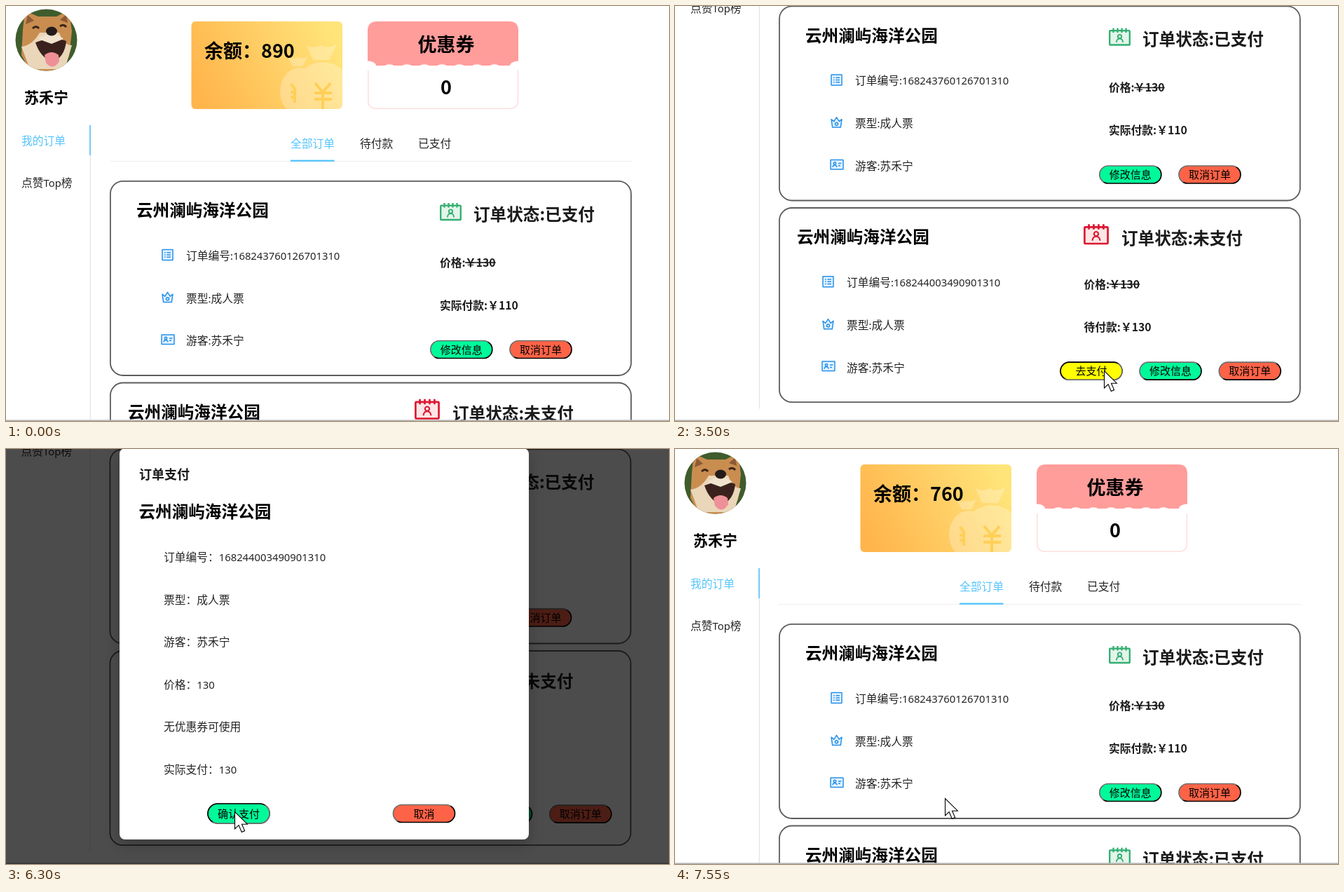
Recreate the animation shown at these times as an HTML page. Size 946 by 592 pixels, loop 8 s.

```html
<!DOCTYPE html>
<html lang="zh-CN">
<head>
<meta charset="utf-8">
<title>我的订单</title>
<style>
html, body { margin: 0; width: 100%; height: 100%; overflow: hidden; background: #fff; }
svg { display: block; width: 946px; height: 592px; }
text { font-family: 'Noto Sans CJK SC', 'Noto Sans CJK', sans-serif; fill: #242424; white-space: pre; }
.latin { font-family: 'Noto Sans', sans-serif; font-size: .94em; }
.bold { font-weight: 700; fill: #1b1b1b; }
.bold .latin { font-family: inherit; font-size: 1em; }
.head { fill: #000; }
.strike { text-decoration: line-through; }
.blue { fill: #55c4fb; }
.mid { text-anchor: middle; }
.icon { fill: #e4f3ff; stroke: #2490ea; stroke-width: 1.5; stroke-linejoin: round; }
#modal { transform-origin: 612px 520px; }
</style>
</head>
<body>
<svg id="stage" viewBox="0 0 946 592" xmlns="http://www.w3.org/2000/svg"></svg>
<script>
const LOOP = 8000, BASE = 15.75, TITLE = 23.6;
const GUEST = '苏禾宁', PARK = '云州澜屿海洋公园';
const GREEN = '#00fa9a', RED = '#ff6347';

// Text placed by its vertical centre; Latin runs get their own face.
const text = (x, cy, str, size = BASE, cls = '') =>
  `<text x="${x}" y="${cy + size * .38}" font-size="${size}" class="${cls}">` +
  str.replace(/[!-~]+/g, m => `<tspan class="latin">${m}</tspan>`) + '</text>';

const rect = (x, y, w, h, r, fill, more = '') =>
  `<rect x="${x}" y="${y}" width="${w}" height="${h}" rx="${r}" fill="${fill}" ${more}/>`;

const group = (x, y, body, more = '') => `<g transform="translate(${x} ${y})" ${more}>${body}</g>`;

function button(cx, cy, label, fill, h = 27, pressId) {
  const pill = (edge, more = '') => rect(cx - 44, cy - h / 2 + 1, 88, h - 2, h / 2 - 1, fill,
    `stroke="url(#${edge})" stroke-width="1.7" ${more}`);
  return pill('outset') + (pressId ? pill('inset', `id="${pressId}"`) : '') +
    text(cx, cy, label, 15, 'mid head');
}

const listIcon = rect(1, 1, 15, 15, .5, '#e4f3ff') +
  '<path d="M4 5.2h1.6M4 8.5h1.6M4 11.8h1.6M7.4 5.2H13M7.4 8.5H13M7.4 11.8H13"/>';
const crownIcon = '<path d="M1 4l3.8 3L8.5 1.2 12.2 7 16 4l-1.7 11.4H2.7z"/><circle cx="8.5" cy="10.6" r="2"/>';
const cardIcon = rect(0, 1, 18, 13.5, .5, '#e4f3ff') +
  '<circle cx="6" cy="6" r="1.7"/><path d="M3 11.5q.4-3 3-3t3 3M11 6h4.4M11 9.3h3"/>';

const statusIcon = (x, y, scale, color, tint) =>
  `<g transform="translate(${x} ${y}) scale(${scale})" fill="none" stroke="${color}" stroke-width="2.3">` +
  rect(1.2, 3.6, 28.6, 20.4, .8, tint) +
  '<path d="M6.5 0v6.5M12.5 0v6.5M18.5 0v6.5M24.5 0v6.5"/>' +
  '<g stroke-width="1.8"><circle cx="15.5" cy="12" r="2.7"/><path d="M10.8 20.3q.5-5.2 4.7-5.2t4.7 5.2"/></g></g>';

// One order card; y values are those of the first card on the page.
function order(number, paid, amount) {
  const dx = paid ? 0 : -12, x = paid ? 619 : 583.5, up = paid ? 0 : 7.3;
  const rows = [[listIcon, '订单编号:' + number], [crownIcon, '票型:成人票'], [cardIcon, '游客:' + GUEST]];
  return rect(148.9, 249.8, 743, 277.2, 18, '#fff', 'stroke="#5c5c5c" stroke-width="1.8"') +
    text(186 + dx, 291.3, PARK, TITLE, 'bold head') +
    rows.map(([icon, label], i) =>
      group(222 + dx, 346.5 + i * 60.7, icon, 'class="icon"') +
      text(257 + dx, 356 + i * 60.7, label)).join('') +
    (paid ? statusIcon(619, 281, 1, '#32ae71', '#e3f5ea') : statusIcon(583, 273, 1.16, '#dc1730', '#fde6e6')) +
    text(paid ? 667 : 637, paid ? 297 : 293, '订单状态:' + (paid ? '已支付' : '未支付'), TITLE, 'bold') +
    text(x, 366 - up, '价格:', BASE, 'bold') +
    text(x + 36, 366 - up, '￥130', BASE, 'bold strike') +
    text(x, 427 - up, (paid ? '实际付款:￥' : '待付款:￥') + amount, BASE, 'bold') +
    (paid ? button(649.8, 490, '修改信息', GREEN) + button(763, 490, '取消订单', RED)
      : button(594, 482.5, '去支付', '#ff0', 27, 'payPress') +
        button(707, 482.5, '修改信息', GREEN) + button(820.3, 482.5, '取消订单', RED));
}

const avatar = `<g clip-path="url(#round)">
  ${rect(13, 4, 90, 90, 0, '#3f5c2d')}
  <path d="M24 34L27 7l19 8h26L90 6l4 30-4 36-14 24H36L22 70z" fill="#c98d50"/>
  <path d="M28 26l3-13 9 8zM88 24l-2-12-9 8z" fill="#8c5a35"/>
  <path d="M22 58q16-2 26-20h28q6 18 18 18l-10 34H34z" fill="#ead6b9"/>
  <path d="M42 52q24-10 44-2-2 22-19 30-18-6-25-28z" fill="#3a211d"/>
  <path d="M46 47q20-14 36 0l-17 7z" fill="#f0e2cc"/>
  <path d="M55 70q10-8 20 0l1 9q-9 14-19 2z" fill="#ee9097"/>
  <ellipse cx="65" cy="36" rx="8" ry="6.5" fill="#241c1a"/>
  <path d="M38 32q5-5 9 0M77 29q5-4 9 1" fill="none" stroke="#3b2417" stroke-width="3"/></g>`;

const balance = rect(264.5, 22, 215.5, 125, 6, 'url(#gold)') +
  `<g clip-path="url(#wallet)"><g fill="#fff" opacity=".27">
  <path d="M402 73q8 4 13 0 7 4 15-1l-7 14h-14zM429 56q11 6 20 0 11 6 23-2l-11 23h-23z"/>
  <ellipse cx="419" cy="122" rx="28" ry="34"/><ellipse cx="452" cy="124" rx="42" ry="44"/></g>
  <path d="M441 110l11 13 11-13M440 124h25M440 133h25M452 123v25M407 111l6 9M406 123h8M406 130h8M412 118v20"
    fill="none" stroke="#ffcf57" stroke-width="4"/></g>` +
  text(283, 63.5, '余额：', 27, 'bold head') +
  `<g id="before">${text(364, 63.5, '890', 27, 'bold head')}</g>` +
  `<g id="after">${text(364, 63.5, '760', 27, 'bold head')}</g>`;

const dashes = Array.from({ length: 7 }, (_, i) =>
  `<ellipse cx="${547 + i * 25}" cy="85.5" rx="6.5" ry="2.2" fill="#fff"/>`).join('');
const coupon = rect(516.8, 70, 213.6, 76.2, 10, '#fff', 'stroke="#ffdfde" stroke-width="1.6"') +
  '<path d="M516 85V35q0-13 13-13h189q13 0 13 13v50z" fill="#ff9d9b"/>' + dashes +
  [516, 731].map(x => `<ellipse cx="${x}" cy="85" rx="12" ry="6.5" fill="#fff"/>`).join('') +
  rect(505, 75, 10.5, 20, 0, '#fff') + rect(731.5, 75, 14, 20, 0, '#fff') +
  text(628, 55, '优惠券', 27, 'bold head mid') + text(628, 116, '0', 27, 'bold head mid');

const sidebar = avatar + text(57.5, 130, GUEST, 21, 'bold head mid') +
  text(22, 192, '我的订单', BASE, 'blue') + text(22, 252.5, '点赞Top榜') +
  rect(119.8, 170, 1, 654, 0, '#dedede') + rect(119.2, 170, 1.6, 43, 0, '#55c4fb');

const tabs = rect(148, 221, 745, 1, 0, '#efefef') + rect(406, 219.6, 62.5, 2.3, 0, '#55c4fb') +
  text(406, 196, '全部订单', BASE, 'blue') + text(505, 196, '待付款') + text(588, 196, '已支付');

const lines = ['订单编号：168244003490901310', '票型：成人票', '游客：' + GUEST, '价格：130', '无优惠券可使用', '实际支付：130'];
const modal = rect(162, -1, 584, 558, 8, '#fff', 'filter="url(#shadow)"') +
  text(190, 36, '订单支付', 18, 'bold') + text(189.5, 89, PARK, TITLE, 'bold head') +
  lines.map((s, i) => text(225, 154 + i * 60.6, s)).join('') +
  button(332, 520, '确认支付', GREEN, 30, 'okPress') + button(596.5, 520, '取消', RED);

const edge = (id, a, b) => `<linearGradient id="${id}" x2="1" y2="1">
  <stop offset=".48" stop-color="${a}"/><stop offset=".52" stop-color="${b}"/></linearGradient>`;

const stage = document.getElementById('stage');
stage.innerHTML = `<defs>
  ${edge('outset', '#6e6e6e', '#000')}${edge('inset', '#000', '#6e6e6e')}
  <linearGradient id="gold" x1="0" y1=".65" x2="1" y2=".35">
    <stop stop-color="#ffb54c"/><stop offset="1" stop-color="#ffe47a"/></linearGradient>
  <clipPath id="round"><circle cx="57.5" cy="48.5" r="44"/></clipPath>
  <clipPath id="wallet">${rect(264.5, 22, 215.5, 125, 6, '#000')}</clipPath>
  <filter id="shadow" x="-10%" y="-10%" width="120%" height="120%">
    <feDropShadow dx="0" dy="7" stdDeviation="10" flood-opacity=".22"/></filter></defs>
  <g id="page">${sidebar}${balance}${coupon}${tabs}
    ${order('168243760126701310', true, 110)}
    ${group(0, 287.7, `<g id="unpaid">${order('168244003490901310', false, 130)}</g>
      <g id="paid">${order('168244003490901310', true, 130)}</g>`)}</g>
  ${rect(0, 590.4, 946, 1.6, 0, '#b4b4b4')}
  <g id="mask">${rect(0, 0, 946, 592, 0, '#000', 'opacity=".7"')}</g>
  <g id="modal">${modal}</g>
  <g id="pointer"><g id="arrow"><path d="M.5.6V25l5.6-5.3 4.2 9.8 4.3-1.9-4.1-9.4h7.8z"
    fill="#fff" stroke="#000" stroke-width="1.1"/></g></g>`;

// Keys are [ms, properties, easing towards the next key].
const run = (id, keys) => document.getElementById(id).animate(
  keys.map(([ms, props, easing = 'linear']) => ({ offset: ms / LOOP, easing, ...props })),
  { duration: LOOP, iterations: Infinity });

// Visible only from one time to another, with hard cuts.
const show = (id, from, to) => run(id, [...new Set([0, from, to, LOOP])].map(ms =>
  [ms, { visibility: ms >= from && ms < to ? 'visible' : 'hidden' }, 'step-end']));

const move = (id, keys) => run(id,
  keys.map(([ms, x, y, easing]) => [ms, { transform: `translate(${x}px, ${y}px)` }, easing]));

const OPEN = 'cubic-bezier(.08,.82,.17,1)', CLOSE = 'cubic-bezier(.78,.14,.15,.86)';
const popup = (id, off, on) => run(id,
  [[0, off], [3685, off, OPEN], [3985, on], [6775, on, CLOSE], [6945, off], [LOOP, off]]);

const END = -249.5;
move('page', [
  [0, 0, 0], [2150, 0, 0, 'ease-in-out'], [2335, 0, -125], [2385, 0, -125, 'ease-in-out'], [2550, 0, END],
  [3685, 0, END, 'step-end'], [3690, -.5, END], [7000, -.5, END, 'ease-in-out'],
  [7220, 0, -125, 'ease-in-out'], [7480, 0, 0], [LOOP, 0, 0]
]);

move('pointer', [
  [0, 842, 483], [100, 842, 483], [300, 700, 310], [500, 480, 120], [650, 320, 12], [780, 268, 50], [900, 303, 95],
  [1000, 301, 40], [1120, 380, 1], [1240, 491, 45], [1330, 465, 120], [1400, 400, 130],
  [1750, 400, 130, 'ease-in-out'], [2150, 687, 372], [2575, 687, 372, 'ease-in'], [2850, 752, 440],
  [3080, 700, 505, 'ease-out'], [3350, 612, 520], [4325, 612, 520, 'ease-in-out'], [4850, 326, 517],
  [7000, 326, 517, 'ease-in-out'], [7550, 385, 498], [LOOP, 385, 498]
]);

popup('mask', { opacity: 0 }, { opacity: 1 });
popup('modal', { opacity: 0, transform: 'scale(.2)' }, { opacity: 1, transform: 'scale(1)' });

show('arrow', 100, LOOP);
show('payPress', 3500, 3700);
show('okPress', 6300, 6400);
show('before', 0, 6800);
show('after', 6800, LOOP);
show('unpaid', 0, 6800);
show('paid', 6800, LOOP);
</script>
</body>
</html>
```
